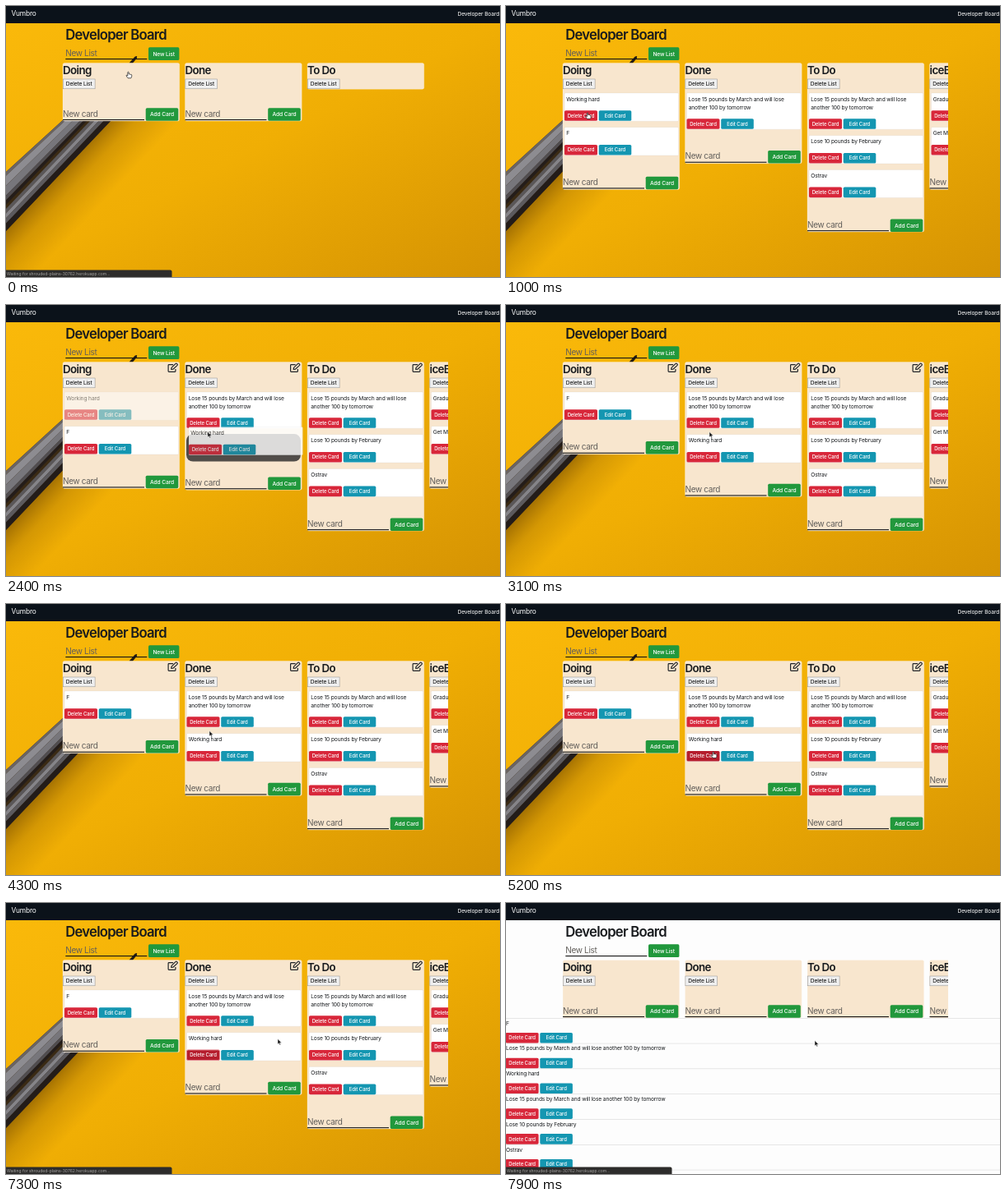
These frames come from a looping animation (600 by 330 pixels, 8000 ms). An HTML page:

```html
<!DOCTYPE html>
<html lang="en">
<head>
<meta charset="utf-8">
<title>Developer Board</title>
<style>
  html, body { margin: 0; width: 100%; height: 100%; overflow: hidden; background: #fff; }
  svg { display: block; width: 600px; height: 330px; }
  text { font-family: Inter, "Liberation Sans", sans-serif; white-space: pre; }
</style>
</head>
<body>
<svg viewBox="0 0 600 330" xmlns="http://www.w3.org/2000/svg">
  <defs>
    <linearGradient id="wall" x1="0" y1="0" x2="1" y2="1">
      <stop offset="0" stop-color="#fab90a"/>
      <stop offset=".5" stop-color="#f0ae04"/>
      <stop offset="1" stop-color="#d59303"/>
    </linearGradient>
    <linearGradient id="shade" gradientUnits="userSpaceOnUse" x1="62" y1="206" x2="108" y2="249">
      <stop offset="0" stop-color="#6b4300" stop-opacity=".6"/>
      <stop offset=".4" stop-color="#8a5a00" stop-opacity=".28"/>
      <stop offset="1" stop-color="#8a5a00" stop-opacity="0"/>
    </linearGradient>
    <clipPath id="strip"><rect y="60" width="537" height="270"/></clipPath>
    <g id="edit" fill="none" stroke="#212529" stroke-width="1.2" stroke-linejoin="round">
      <path d="M6.6 2H1.4Q.6 2 .6 2.8V10Q.6 10.8 1.4 10.8H8.6Q9.4 10.8 9.4 10V7.4"/>
      <path d="M4.2 7.9L4.5 5.8L9.6 .8Q10.2 .3 10.8 .8L11.6 1.6Q12.1 2.2 11.6 2.8L6.4 7.6Z"/>
    </g>
    <path id="arrow" d="M0 0V6.6L1.5 5.2L2.5 7.5L3.6 7L2.6 4.8H4.7Z"
      fill="#111" stroke="#fff" stroke-width=".5" stroke-linejoin="round"/>
    <path id="hand" d="M-.7 .4Q0 -.5 .7 .4V2.7Q1.5 2.1 2 2.9Q2.7 2.4 3.2 3.2Q4 2.9 4.2 3.8V5.4Q4 6.6 3.3 7.5H-.4Q-1.5 6.2-2.5 4.5Q-2.3 3.4-1.2 4.2L-.7 4.8Z"
      fill="#fff" stroke="#111" stroke-width=".7" stroke-linejoin="round"/>
  </defs>
  <g id="page"></g>
  <g id="ghost" opacity=".8"></g>
  <use id="cursor"/>
</svg>
<script>
const LOOP = 8000, STEP = 100;
const T = { lists: 200, cards: 300, icons: 1200, grab: 1400, enter: 1900, drop: 2800, hover: 5200, click: 5600, reload: 7700 };
const RED = '#d8273a', DARK_RED = '#b51d2d', TEAL = '#1496b1', GREEN = '#21983c', INK = '#171a1d';
const GRAB_POINT = [94, 112];
const $ = id => document.getElementById(id);

// [time, x, y]
const cursorPath = [
  [0, 148.5, 80.3], [300, 148.5, 80.3], [1000, 99, 130], [1300, ...GRAB_POINT], [T.grab, ...GRAB_POINT],
  [2300, 245, 154.5], [T.drop, 245, 154.5], [3100, 247, 154.5], [4600, 247, 154.5], [5300, 252, 181.5],
  [6300, 252, 181.5], [7000, 330, 165.5], [7300, 330, 165.5], [7800, 375, 167.5], [LOOP, 375, 167.5]
];

const longText = 'Lose 15 pounds by March and will lose another 100 by tomorrow';
const card = (...lines) => ({ lines, height: 24.2 + 10 * lines.length });
const long = card('Lose 15 pounds by March and will lose', 'another 100 by tomorrow');
const working = card('Working hard'), single = card('F');
const todo = [long, card('Lose 10 pounds by February'), card('Ostrav')];
const ice = [card('Graduate'), card('Get Married')];

const rect = (x, y, w, h, fill, extra = '') =>
  `<rect x="${x}" y="${y}" width="${w}" height="${h}" fill="${fill}" ${extra}/>`;

function text(x, y, str, size, { fill = INK, weight = 400, track = -.02, anchor = 'start' } = {}) {
  return `<text x="${x}" y="${y}" font-size="${size}" font-weight="${weight}" fill="${fill}"
    letter-spacing="${track}em" text-anchor="${anchor}">${str}</text>`;
}

function button(x, y, w, h, label, fill, size, extra = '') {
  return rect(x, y, w, h, fill, `rx="1.6" ${extra}`) +
    text(x + w / 2, y + h / 2 + size * .36, label, size, { fill: '#fff', weight: 500, anchor: 'middle', track: -.015 });
}

function cardButtons(x, y, pressed) {
  const ring = 'stroke="#e58a93" stroke-width="1"';
  return button(x, y, 40, 12.6, 'Delete Card', pressed ? DARK_RED : RED, 6, pressed === 'focus' ? ring : '') +
    button(x + 41.7, y, 39.6, 12.6, 'Edit Card', TEAL, 6);
}

function drawCard(x, y, { lines, height }, pressed) {
  return rect(x, y, 138.5, height, '#fff', 'rx="1.2" stroke="#000" stroke-opacity=".1" stroke-width=".4"') +
    lines.map((line, i) => text(x + 2.2, y + 9.6 + i * 10, line, 6.67)).join('') +
    cardButtons(x, y + height - 13, pressed);
}

function input(x, bottom, label) {
  return text(x, bottom - 5.5, label, 10, { fill: '#625f5b', track: -.035 }) +
    rect(x, bottom - 2, 99, 1.1, '#141414');
}

function drawList(column, title, cards, s) {
  const x = 69 + column * 148.5;
  let y = 106, body = '';
  cards.forEach((c, i) => {
    const faded = s.dragging && column === 0 && i === 0;
    const art = drawCard(x + 2, y, c, column === 1 && i === 1 ? s.pressed : '');
    body += faded ? `<g opacity=".5">${art}</g>` : art;
    y += c.height + 7.5;
  });
  if (column === 1 && s.slot) {
    body += rect(x + 1.5, y - .6, 139, 33.4, '#514d49', 'rx="8"');
    y += 33.5;
  }
  const partial = s.partial && column === 2;
  const bottom = partial ? 101.3 : y + 34;
  const footer = partial ? '' : input(x, bottom, 'New card') +
    button(x + 100.7, bottom - 15.7, 39.6, 15.5, 'Add Card', GREEN, 6.67);
  return rect(x, 69.5, 141.7, bottom - 69.5, '#f8e6ce', 'rx="2" stroke="#fff" stroke-opacity=".5" stroke-width=".5"') +
    text(x, 82.7, title, 13.33, { weight: 600, track: -.045 }) +
    rect(x + .4, 89, 38.7, 11.8, '#efefef', 'stroke="#8a8a8a" stroke-width=".5"') +
    text(x + 19.7, 97.2, 'Delete List', 6.67, { fill: '#000', anchor: 'middle' }) +
    body + footer + (s.icons ? `<use href="#edit" x="${x + 127.5}" y="70.6"/>` : '');
}

// A band that narrows from the left edge (top a, bottom b) to the height y = 138 (left c, right d).
const band = (a, b, c, d, fill) => `<path d="M0 ${a}L${c} 138H${d}L0 ${b}Z" fill="${fill}"/>`;

function pencil(a, b, c, d, tones) {
  const mix = (p, q, u) => p + (q - p) * u;
  return tones.map(([from, to, fill]) =>
    band(mix(a, b, from), mix(a, b, to), mix(c, d, from), mix(c, d, to), fill)).join('');
}

function wallpaper() {
  return rect(0, 21, 600, 309, 'url(#wall)') +
    '<path d="M0 272L129 138H250L60 330H0Z" fill="url(#shade)"/>' +
    band(202, 274, 70, 129, '#3a2a14') +
    pencil(202, 242, 70, 100, [[0, .12, '#6a6462'], [.12, .42, '#8d8c91'], [.42, .72, '#77767b'], [.72, .86, '#504d50'], [.86, 1, '#241d1a']]) +
    pencil(247, 274, 104, 129, [[0, .2, '#5a5759'], [.2, .42, '#858489'], [.42, .66, '#5c5a5e'], [.66, 1, '#231c19']]) +
    '<path d="M149.5 69.5L156.5 61.8Q160 59.6 158.9 63.4L154 69.5Z" fill="#211a14"/>';
}

function looseCards() {
  const rows = ['F', longText, 'Working hard', longText, 'Lose 10 pounds by February', 'Ostrav'];
  return rect(0, 140, 600, .5, '#cfcfcf') + rows.map((row, i) => {
    const y = 140.4 + i * 30.8;
    return text(0, y + 8.1, row, 6.67) + rect(0, y + 30.4, 600, .5, '#cfcfcf') +
      cardButtons(-.4, y + 17.5, '');
  }).join('');
}

function drawPage(s) {
  const titles = ['Doing', 'Done', 'To Do', 'iceBox'];
  const lists = s.cards
    ? [s.dropped ? [single] : [working, single], s.dropped ? [long, working] : [long], todo, ice]
    : [[], [], [], []];
  const shown = s.partial ? 3 : 4;
  return (s.bare ? rect(0, 21, 600, 309, '#fdfdfd') + looseCards() : wallpaper()) +
    rect(0, 0, 600, 21, '#0b121a') +
    text(6.5, 12.4, 'Vumbro', 8.33, { fill: '#fff' }) +
    text(548.5, 11.6, 'Developer Board', 6.67, { fill: '#fff' }) +
    text(72.3, 41, 'Developer Board', 16.67, { weight: 600, track: -.045 }) +
    input(72.3, 66, 'New List') +
    button(173, 50.3, 37.4, 15.7, 'New List', GREEN, 6.67) +
    '<g clip-path="url(#strip)">' +
    titles.slice(0, shown).map((title, i) => drawList(i, title, lists[i], s)).join('') + '</g>' +
    (s.waiting ? rect(-3, 321.4, 204.5, 12, '#2d2c2b', 'rx="2"') +
      text(1, 327.5, 'Waiting for shrouded-plains-30762.herokuapp.com...', 5, { fill: '#aaa9a7', track: 0 }) : '');
}

function stateAt(t) {
  const bare = t >= T.reload;
  return {
    bare,
    partial: t < T.lists,
    cards: t >= T.cards && !bare,
    icons: t >= T.icons && !bare,
    dragging: t >= T.grab && t < T.drop,
    slot: t >= T.enter && t < T.drop,
    dropped: t >= T.drop,
    pressed: t >= T.click ? 'focus' : t >= T.hover ? 'hover' : '',
    waiting: t < T.cards || t >= T.click
  };
}

function cursorAt(t) {
  const i = Math.max(1, cursorPath.findIndex(p => p[0] > t));
  const [t0, x0, y0] = cursorPath[i - 1], [t1, x1, y1] = cursorPath[i];
  const u = (t - t0) / (t1 - t0), e = u * u * (3 - 2 * u);
  return [x0 + (x1 - x0) * e, y0 + (y1 - y0) * e];
}

let lastKey = '';
function render(time) {
  const t = Math.floor(time % LOOP / STEP) * STEP;
  const state = stateAt(t), key = JSON.stringify(state);
  if (key !== lastKey) {
    $('page').innerHTML = drawPage(state);
    lastKey = key;
  }
  const [x, y] = cursorAt(t);
  const pointing = t < 1200 || (t >= T.hover && t < 6500);
  $('cursor').setAttribute('href', pointing ? '#hand' : '#arrow');
  $('cursor').setAttribute('transform', `translate(${x} ${y})`);
  $('ghost').setAttribute('visibility', state.dragging ? 'visible' : 'hidden');
  $('ghost').setAttribute('transform', `translate(${x - GRAB_POINT[0]} ${y - GRAB_POINT[1]})`);
}

$('ghost').innerHTML = drawCard(71, 106, working, '');
const start = performance.now();
function tick() {
  render(performance.now() - start);
  requestAnimationFrame(tick);
}
tick();
</script>
</body>
</html>
```
